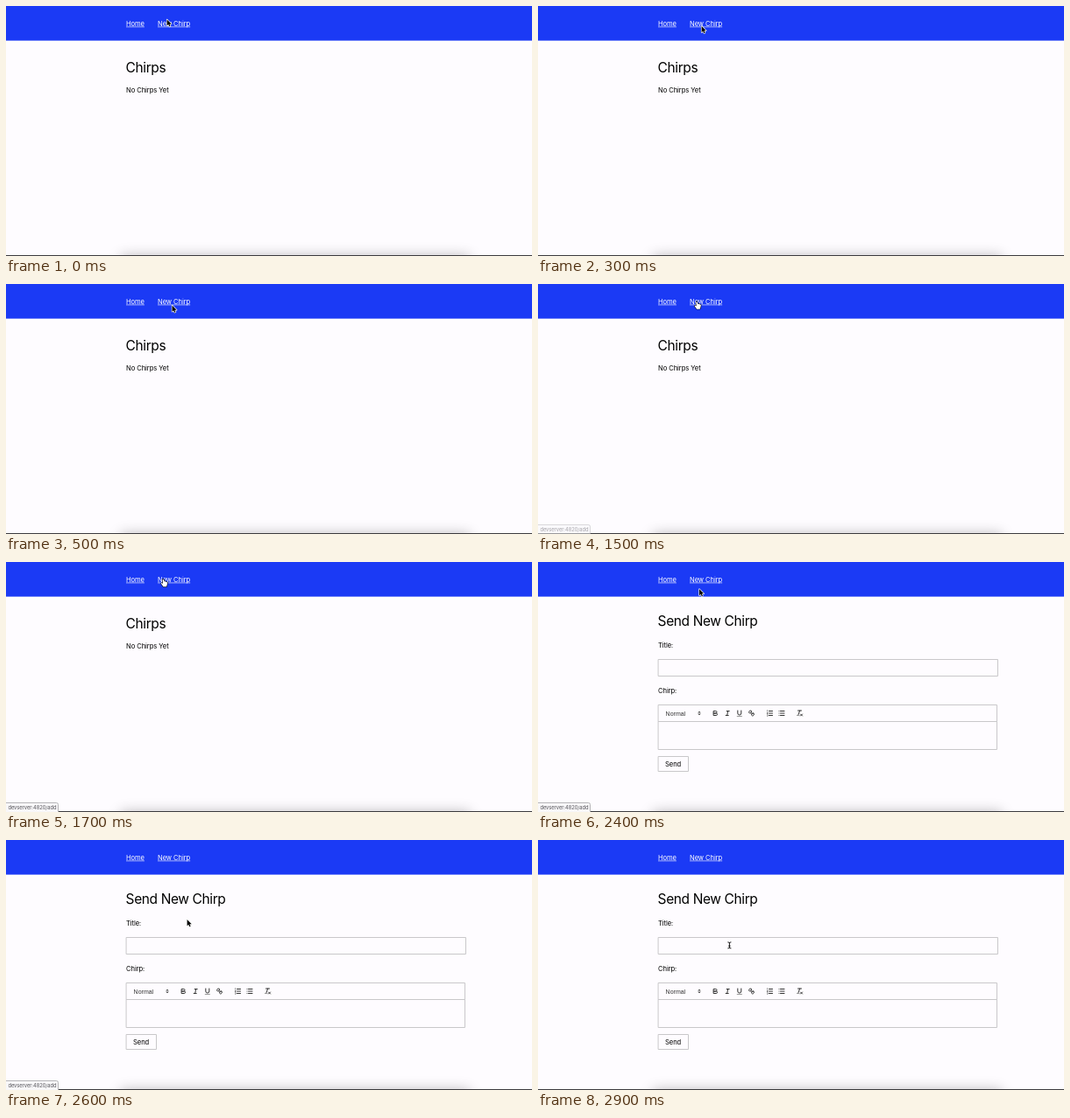
These frames come from a looping animation (600x286 px, 5 s). An HTML page with a canvas:

```html
<!DOCTYPE html>
<html lang="en">
<head>
<meta charset="utf-8">
<title>New Chirp</title>
<style>
html, body { margin: 0; width: 100%; height: 100%; overflow: hidden; background: #fefcff; }
canvas { display: block; width: 600px; height: 286px; }
</style>
</head>
<body>
<canvas id="stage"></canvas>
<script>
const LOOP = 5000, STEP = 100, W = 600, H = 286, LEFT = 137;
const SANS = 'Inter, "Noto Sans", sans-serif';
const canvas = document.getElementById('stage');
const ctx = canvas.getContext('2d');
const ratio = window.devicePixelRatio || 1;
canvas.width = W * ratio;
canvas.height = H * ratio;

// Pointer path: time, x, y, shape
const pointer = [
  [0, 183.6, 15.4, 'arrow'],
  [300, 186.6, 23, 'arrow'],
  [500, 189.5, 24.5, 'arrow'],
  [1200, 189.5, 24.5, 'arrow'],
  [1300, 183.4, 24.8, 'hand'],
  [1700, 180, 23.8, 'hand'],
  [2300, 180, 23.8, 'hand'],
  [2400, 184, 31, 'arrow'],
  [2600, 206.6, 91, 'arrow'],
  [2700, 213, 108, 'arrow'],
  [2800, 217, 117, 'beam'],
  [2900, 218.4, 120.4, 'beam'],
  [LOOP, 218.4, 120.4, 'beam']
];

const shapes = {
  arrow: new Path2D('M0 0V7.2L1.7 5.7L2.8 8.2L4 7.7L2.9 5.3H5.2Z'),
  hand: new Path2D('M-1.4 -3.4C-1.4 -4.4 0 -4.4 .1 -3.4L.4 -1.5C1 -2 1.6 -1.8 1.8 -1.2' +
    'C2.4 -1.6 3 -1.3 3.1 -.7C3.8 -.9 4.2 -.4 4.2 .3L3.6 2.7L3 4.4H-.6L-2.9 1.2' +
    'C-3.4 .4 -2.6 -.1 -2 .4L-1 1Z'),
  beam: new Path2D('M-1.6 -3.5Q0 -3.5 0 -2.6Q0 -3.5 1.6 -3.5M0 -2.6V2.6M-1.6 3.5Q0 3.5 0 2.6Q0 3.5 1.6 3.5M-.8 .8H.8')
};

// Toolbar icons on an 18 unit grid
const icons = [
  [179.5, 'M7 7L9 5L11 7ZM7 11L9 13L11 11Z', 'M7 7L9 5L11 7ZM7 11L9 13L11 11Z'],
  [198, 'M5 4H9.5A2.5 2.5 0 0 1 9.5 9H5ZM5 9H10.5A2.5 2.5 0 0 1 10.5 14H5Z'],
  [211.7, 'M7 4H13M5 14H11M8 14L10 4'],
  [225.3, 'M5 3V9A4 4 0 0 0 13 9V3', 'M3 15H15V16H3Z'],
  [239, 'M7 7L11 11M8.9 4.6A3.5 3.5 0 0 1 4.6 8.9C3.2 7.5 2 6.4 4.2 4.2S7.5 3.2 8.9 4.6Z' +
    'M13.4 9.1A3.5 3.5 0 0 0 9.1 13.4C10.5 14.8 11.6 16 13.8 13.8S14.8 10.5 13.4 9.1Z'],
  [260, 'M7 4H15M7 9H15M7 14H15', 'M2.5 2H4V6H3V3H2.5ZM2.2 7H4.5V8.6L3.4 10H4.5V11H2.2V10L3.5 8H2.2ZM2.4 12H4.6V16H2.4V15H3.6V14.4H2.8V13.6H3.6V13H2.4Z'],
  [273.5, 'M6 4H15M6 9H15M6 14H15M3 4H3.01M3 9H3.01M3 14H3.01'],
  [294, 'M5 3H13M6 12L9.35 3M11 11L15 15M15 11L11 15', 'M2 14H9V15H2Z']
].map(([x, line, fill]) => ({ x, line: new Path2D(line), fill: fill && new Path2D(fill) }));

function text(str, x, y, size, color = '#000', family = SANS, spacing = -0.01) {
  ctx.font = `${size}px ${family}`;
  ctx.letterSpacing = `${spacing * size}px`;
  ctx.fillStyle = color;
  ctx.fillText(str, x, y);
  return ctx.measureText(str).width;
}

function heading(str, y) {
  text(str, LEFT - 0.4, y, 15.5, '#000', SANS, -0.025);
}

function box(x, y, w, h) {
  ctx.strokeStyle = '#c9c8ca';
  ctx.lineWidth = 1;
  ctx.strokeRect(x + 0.5, y + 0.5, w - 1, h - 1);
}

function link(str, x) {
  const width = text(str, x, 22.7, 7.6, '#fff');
  ctx.globalAlpha = 0.75;
  ctx.fillRect(x, 23.5, width, 0.8);
  ctx.globalAlpha = 1;
}

function drawFrame() {
  ctx.fillStyle = '#fefcff';
  ctx.fillRect(0, 0, W, H);
  ctx.fillStyle = '#1b3af5';
  ctx.fillRect(0, 0, W, 39.6);
  link('Home', LEFT);
  link('New Chirp', 173);

  // Soft shadow of a window below the page
  ctx.save();
  ctx.shadowColor = 'rgba(0,0,0,.28)';
  ctx.shadowBlur = 15 * ratio;
  ctx.fillStyle = '#000';
  ctx.fillRect(131, 286, 398, 30);
  ctx.restore();
  ctx.fillStyle = '#3b3a3d';
  ctx.fillRect(0, 285, W, 1);
}

function drawList() {
  heading('Chirps', 75.6);
  text('No Chirps Yet', LEFT, 98.6, 7.6);
}

function drawForm() {
  heading('Send New Chirp', 72.8);
  text('Title:', LEFT, 97.6, 7.6);
  box(LEFT, 111, 388, 20);
  text('Chirp:', LEFT, 149.8, 7.6);
  box(LEFT, 163, 387, 20);
  box(LEFT, 182, 387, 33);
  text('Normal', 145.6, 175.5, 7, '#333', '"Liberation Sans", Arial, sans-serif', 0);
  box(LEFT, 222, 35, 18);
  text('Send', 145, 233.8, 7.6);
  ctx.lineCap = ctx.lineJoin = 'round';
  for (const icon of icons) {
    ctx.save();
    ctx.translate(icon.x, 168.5);
    ctx.scale(0.5, 0.5);
    ctx.strokeStyle = ctx.fillStyle = '#333';
    ctx.lineWidth = icon === icons[0] ? 1 : 2;
    ctx.stroke(icon.line);
    if (icon.fill) ctx.fill(icon.fill);
    ctx.restore();
  }
}

function drawStatus(alpha) {
  if (alpha <= 0) return;
  ctx.globalAlpha = alpha;
  ctx.beginPath();
  ctx.roundRect(-3, 275.5, 62.5, 14, 2);
  ctx.fillStyle = '#f8f7f9';
  ctx.fill();
  ctx.strokeStyle = '#b5b4b7';
  ctx.lineWidth = 1;
  ctx.stroke();
  text('devserver:4820/add', 2.4, 282.8, 5.8, '#55545a');
  ctx.globalAlpha = 1;
}

function drawPointer(t) {
  const next = pointer.findIndex(key => key[0] > t);
  const [t0, x0, y0, kind] = pointer[next - 1];
  const [t1, x1, y1] = pointer[next];
  const k = (t - t0) / (t1 - t0);
  ctx.save();
  ctx.translate(x0 + (x1 - x0) * k, y0 + (y1 - y0) * k);
  ctx.lineJoin = 'round';
  const path = shapes[kind];
  if (kind === 'arrow') {
    ctx.strokeStyle = '#fff';
    ctx.lineWidth = 1.3;
    ctx.stroke(path);
    ctx.fillStyle = '#000';
    ctx.fill(path);
  } else {
    ctx.strokeStyle = '#000';
    ctx.lineWidth = kind === 'hand' ? 1.1 : 0.9;
    ctx.stroke(path);
    if (kind === 'hand') {
      ctx.fillStyle = '#fff';
      ctx.fill(path);
    }
  }
  ctx.restore();
}

function statusAlpha(t) {
  const fadeIn = (t - 1400) / 200;
  const fadeOut = (2900 - t) / 300;
  return Math.max(0, Math.min(1, fadeIn, fadeOut));
}

function render() {
  const t = Math.floor((performance.now() % LOOP) / STEP) * STEP;
  ctx.setTransform(ratio, 0, 0, ratio, 0, 0);
  drawFrame();
  if (t < 2000) drawList();
  else drawForm();
  drawStatus(statusAlpha(t));
  drawPointer(t);
  requestAnimationFrame(render);
}
render();
</script>
</body>
</html>
```
